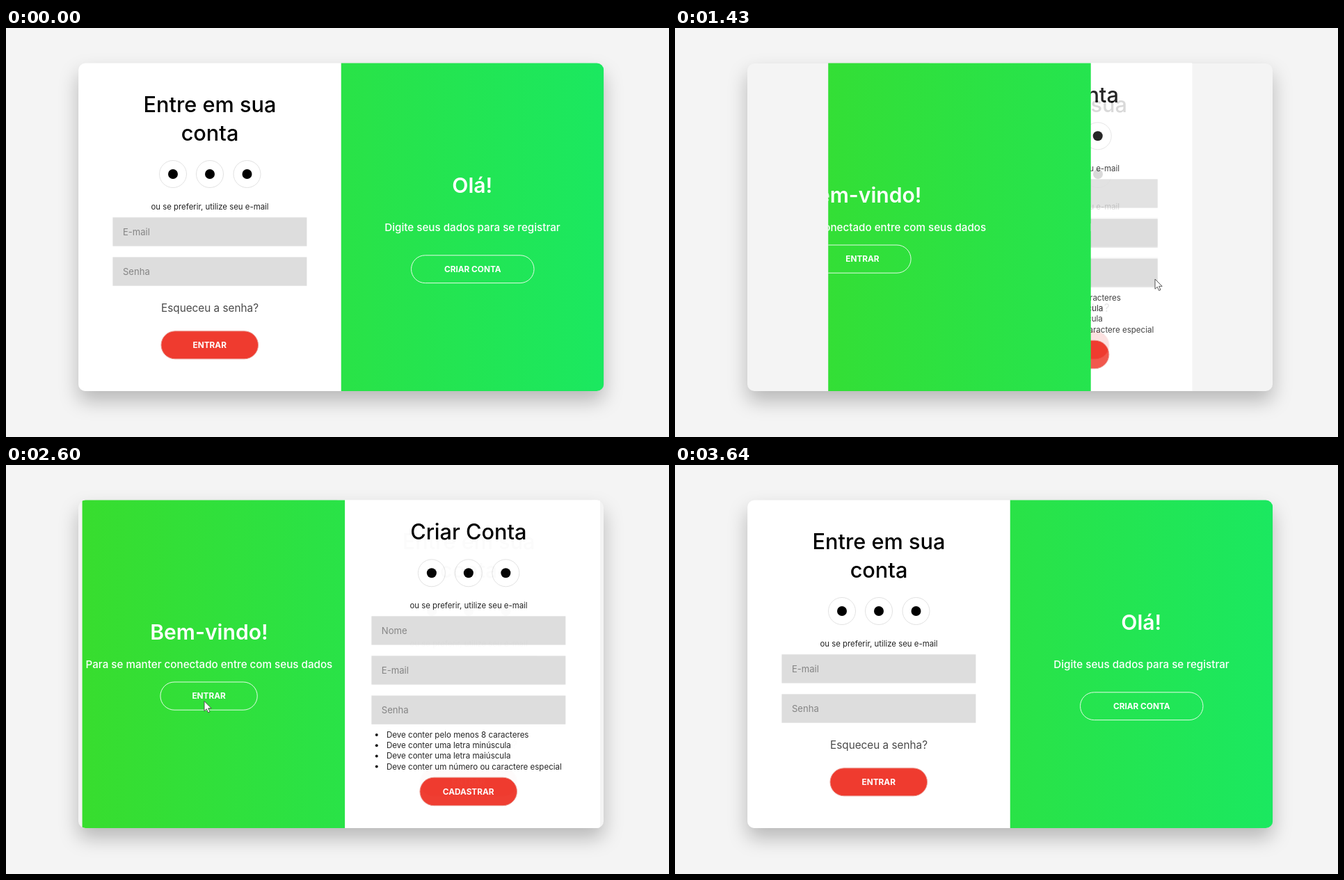
Animation, 953 px wide and 588 px high, one loop 3770 ms. Source, as an HTML page:

```html
<!DOCTYPE html>
<html lang="pt-BR">
<head>
<meta charset="utf-8">
<title>Entrar / Criar conta</title>
<style>
  html, body { margin: 0; width: 100%; height: 100%; overflow: hidden; background: #f4f4f4; }
  .shadow {
    position: absolute; left: 104.25px; top: 50.6px; width: 755px; height: 471.4px; border-radius: 10px;
    background: #f4f4f4;
    box-shadow: 0 14px 28px rgba(0,0,0,.25);
  }
  svg { position: absolute; left: 0; top: 0; }
  text { font-family: Inter, "Open Sans", sans-serif; }
  .title { font-size: 30.7px; font-weight: 500; }
  .hello { font-size: 30.1px; font-weight: 600; fill: #fff; }
  .lead { font-size: 15.2px; font-weight: 450; fill: #fff; }
  .note { font-size: 11.4px; fill: #222; }
  .rule { font-size: 11.55px; fill: #222; }
  .link { font-size: 15.3px; fill: #4a4a4a; }
  .hint { font-size: 13.1px; fill: #858585; }
  .label { font-size: 11.8px; font-weight: 700; fill: #fff; }
</style>
</head>
<body>
<div class="shadow"></div>
<svg id="stage" width="953" height="588" viewBox="0 0 953 588">
  <defs>
    <linearGradient id="green" gradientUnits="userSpaceOnUse" x1="104" y1="0" x2="859" y2="0">
      <stop offset="0" stop-color="#38dd2e"/>
      <stop offset="1" stop-color="#1be860"/>
    </linearGradient>
    <clipPath id="card"><rect x="104.25" y="50.6" width="755" height="471.4" rx="10"/></clipPath>
    <clipPath id="window"><rect id="slot" y="50" width="377.5" height="473"/></clipPath>
  </defs>
  <g clip-path="url(#card)">
    <g id="signIn"></g>
    <g id="signUp"></g>
    <g clip-path="url(#window)">
      <rect x="104" y="50" width="756" height="473" fill="url(#green)"/>
      <g id="welcome"></g>
      <g id="greet"></g>
    </g>
  </g>
  <path id="cursor" d="M0 0V14.2L3.3 11.2L5.6 16.4L8 15.4L5.7 10.3H10.2Z"
        fill="#fff" stroke="#444" stroke-width=".9" stroke-linejoin="round"/>
</svg>
<script>
const $ = id => document.getElementById(id);
const LEFT = 104.25, HALF = 377.5, LOOP = 3770, STEP = 130;
const SLIDE = 588, OPEN = 1068, CLOSE = 2550;

function add(parent, tag, attrs, content) {
  const el = document.createElementNS("http://www.w3.org/2000/svg", tag);
  for (const key in attrs) el.setAttribute(key, attrs[key]);
  if (content) el.textContent = content;
  return parent.appendChild(el);
}
const text = (g, cls, x, y, str, anchor = "middle") =>
  add(g, "text", { class: cls, x, y, "text-anchor": anchor }, str);

function pill(g, x, y, width, height, label, fill, stroke) {
  add(g, "rect", { x, y, width, height, rx: height / 2, fill, stroke });
  text(g, "label", x + width / 2, y + height / 2 + 4.3, label);
}
function field(g, x, y, label) {
  add(g, "rect", { x, y, width: 279, height: 41.3, fill: "#ddd" });
  text(g, "hint", x + 14.5, y + 25.3, label, "start");
}
function socials(g, cx, cy) {
  for (const dx of [-53, 0, 53.5]) {
    add(g, "circle", { cx: cx + dx, cy, r: 19.5, fill: "none", stroke: "#e2e2e2" });
    add(g, "circle", { cx: cx + dx, cy, r: 7, fill: "#000" });
  }
}
const sheet = g => add(g, "rect", { x: LEFT, y: 50, width: HALF, height: 473, fill: "#fff" });

// Both forms are laid out in the left half and slide together.
const signIn = $("signIn"), signUp = $("signUp"), welcome = $("welcome"), greet = $("greet");
const NOTE = "ou se preferir, utilize seu e-mail";

sheet(signIn);
text(signIn, "title", 293, 120.5, "Entre em sua");
text(signIn, "title", 293, 161.5, "conta");
socials(signIn, 293, 210);
text(signIn, "note", 293, 261, NOTE);
field(signIn, 153.4, 272.3, "E-mail");
field(signIn, 153.4, 329.4, "Senha");
text(signIn, "link", 293, 408.3, "Esqueceu a senha?");
pill(signIn, 223, 435.8, 139.5, 40, "ENTRAR", "#ef3b2f", "#e9958c");

sheet(signUp);
text(signUp, "title", 292.7, 107, "Criar Conta");
socials(signUp, 292.7, 155.3);
text(signUp, "note", 292.9, 206.3, NOTE);
["Nome", "E-mail", "Senha"].forEach((s, i) => field(signUp, 153.2, 217.3 + i * 57.1, s));
["pelo menos 8 caracteres", "uma letra minúscula", "uma letra maiúscula",
 "um número ou caractere especial"].forEach((s, i) => {
  const y = 392 + i * 15.2;
  add(signUp, "circle", { cx: 160.6, cy: y - 4, r: 2, fill: "#111" });
  text(signUp, "rule", 174.8, y, "Deve conter " + s, "start");
});
pill(signUp, 222.8, 449.2, 139.5, 40.5, "CADASTRAR", "#ef3b2f", "#e9958c");

text(welcome, "hello", 293, 251.3, "Bem-vindo!");
text(welcome, "lead", 293, 292.3, "Para se manter conectado entre com seus dados");
pill(welcome, 223, 312, 139.3, 40.2, "ENTRAR", "none", "#e4fbe6");

text(greet, "hello", 670.3, 237, "Olá!");
text(greet, "lead", 670.5, 292.3, "Digite seus dados para se registrar");
pill(greet, 582.5, 326.8, 176.5, 39.8, "CRIAR CONTA", "none", "#e4fbe6");

// Time, x, y of the pointer tip.
const PATH = [
  [130, 735, 549], [390, 720, 440], [650, 695, 372], [780, 692.5, 362.5], [1170, 690, 361],
  [1430, 690, 361], [1690, 520, 372], [1950, 289, 369], [2210, 285, 339.5], [2600, 285, 339.5],
  [2730, 250, 372], [2860, 176, 451], [2990, 120, 503], [3120, 76, 549]
];

// cubic-bezier(.42, 0, .58, 1), solved by bisection
function ease(x) {
  if (x <= 0) return 0;
  if (x >= 1) return 1;
  let lo = 0, hi = 1, u;
  for (let i = 0; i < 24; i++) {
    u = (lo + hi) / 2;
    const v = 1 - u;
    if (1.26 * v * v * u + 1.74 * v * u * u + u * u * u < x) lo = u; else hi = u;
  }
  return u * u * (3 - 2 * u);
}
const shift = (el, x, y = 0) => el.setAttribute("transform", `translate(${x} ${y})`);

function movePointer(t) {
  const i = PATH.findIndex(k => k[0] >= t);
  const shown = i >= 0 && t >= PATH[0][0];
  $("cursor").setAttribute("visibility", shown ? "visible" : "hidden");
  if (!shown) return;
  const b = PATH[i], a = PATH[Math.max(0, i - 1)];
  const k = b === a ? 0 : (t - a[0]) / (b[0] - a[0]);
  shift($("cursor"), a[1] + (b[1] - a[1]) * k, a[2] + (b[2] - a[2]) * k);
}

function draw(t) {
  const closing = t >= CLOSE;
  const p = closing ? 1 - ease((t - CLOSE) / SLIDE) : ease((t - OPEN) / SLIDE);
  // The sign-up form appears halfway open, and drops behind late while closing.
  const fade = closing ? (p > .375 ? p : 0)
                       : Math.min(1, Math.max(0, (t - OPEN - SLIDE / 2) / 80));
  shift(signIn, HALF * p);
  shift(signUp, HALF * p);
  signUp.setAttribute("opacity", fade);
  $("slot").setAttribute("x", LEFT + HALF * (1 - p));
  shift(welcome, -.2 * HALF * (1 - p));
  shift(greet, .2 * HALF * p);
  movePointer(t);
}

const start = performance.now();
function tick() {
  const t = (performance.now() - start) % LOOP;
  draw(Math.floor(t / STEP) * STEP);
  requestAnimationFrame(tick);
}
tick();
</script>
</body>
</html>
```
